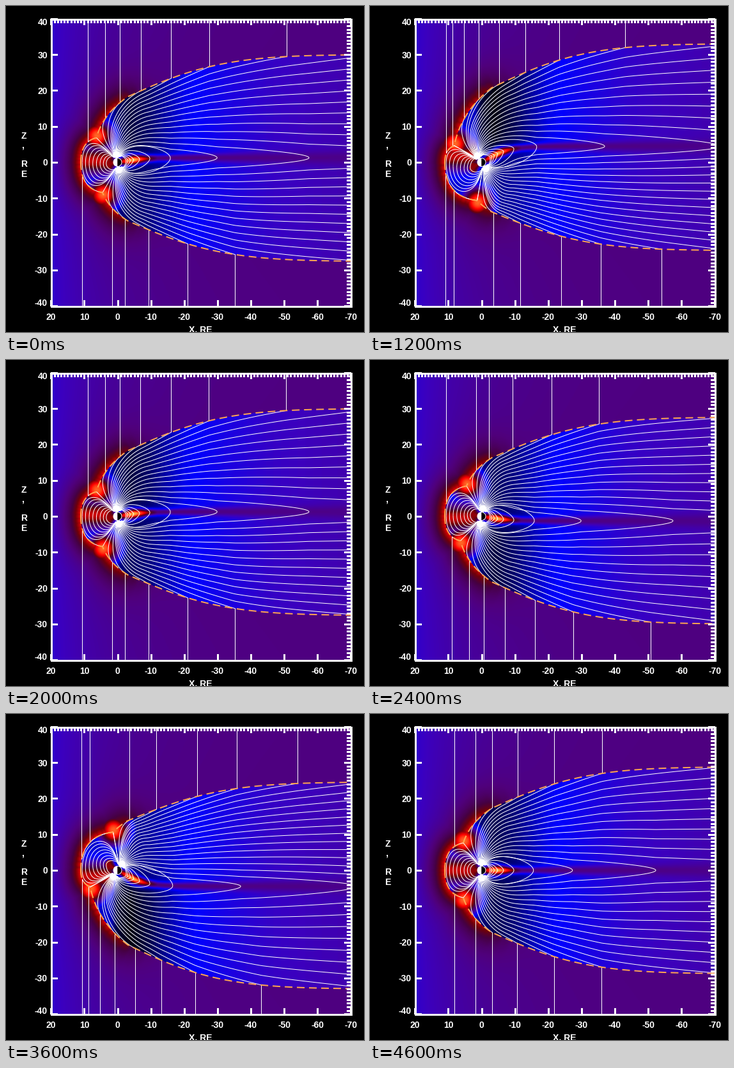
Write a matplotlib script that moves like this. It is 560 by 511 pixels and loops after 4800 ms.

```python
import numpy as np
import matplotlib.pyplot as plt
from matplotlib.animation import FuncAnimation
from matplotlib.collections import LineCollection
from matplotlib.colors import LinearSegmentedColormap
from matplotlib.patches import Circle, Rectangle, Wedge

W, H, DPI = 560, 511, 64
PT = 72 / DPI
FRAMES, INTERVAL = 24, 200
OX, OY = 174.5, 245          # Earth, in pixels
SX, SZ = 5.21, 5.63          # pixels per Earth radius
LEFT, RIGHT, TOP, BOTTOM = 70, 539, 20, 470
MAX_TILT = np.radians(35)

# Where each open line leaves the magnetopause, for a range of tilts.
TILTS = np.sin(np.radians([-75, -45, -15, 0, 15, 45, 75]))
EXITS = {
    -2: [118, 110, 110, 110, 110, 110, 110],
    -1: [131, 117, 110, 110, 110, 110, 110],
    0: [193, 149, 119, 110, 110, 110, 110],
    1: [235, 187, 166, 132, 128, 122, 119],
    2: [299, 226, 186, 165, 155, 134, 129],
    3: [361, 294, 223, 191, 178, 159, 147],
    4: [456, 366, 284, 231, 211, 184, 170],
    5: [560, 456, 358, 288, 258, 220, 202],
    6: [640, 560, 556, 363, 318, 265, 243],
    7: [720, 650, 640, 548, 439, 330, 296],
    8: [800, 740, 730, 640, 575, 548, 399],
    9: [880, 830, 820, 740, 680, 640, 570],
}
LAST_OPEN, FIRST_LOOP, LAST_LOOP = 18, 19, 25
DAY_LOOPS = [0.97, 0.88, 0.78, 0.68, 0.58, 0.48, 0.39, 0.31]

CMAP = LinearSegmentedColormap.from_list("heat", [
    (0, "#000000"), (0.25, "#0000ff"), (0.36, "#3c00be"), (0.46, "#50007d"),
    (0.55, "#460041"), (0.62, "#6e000a"), (0.75, "#ff0000"),
    (0.9, "#ff8c32"), (1, "#ffe650")])


def bezier(*pts, n=24):
    t = np.linspace(0, 1, n)[:, None]
    pts = [np.asarray(p, float) for p in pts]
    while len(pts) > 1:
        pts = [(1 - t) * a + t * b for a, b in zip(pts, pts[1:])]
    return pts[0]


def polar(angle, length):
    return length * np.array([np.cos(angle), np.sin(angle)])


def rotate(v, a):
    c, s = np.cos(a), np.sin(a)
    return np.array([v[0] * c - v[1] * s, v[0] * s + v[1] * c])


def sheet(x, s):
    """Height of the hinged current sheet above the axis."""
    return 8 * SZ * np.sin(MAX_TILT * s) * np.tanh((x - OX) / (8 * SX))


def cusp(s):
    return np.array([146 - 18.5 * s + 4 * s * s, 43 - 17.5 * s])


def boundary(s):
    """Magnetopause of one hemisphere, from the nose down the tail."""
    u = np.linspace(0, 380, 60)
    rise = 8 * SZ * np.sin(MAX_TILT * s) * (0.78 + 0.17 * np.tanh(u / 120))
    tail = np.c_[190 + u, 162 - 65 * np.exp(-u / 145 - u**2 / 45000) + rise]
    c, p = cusp(s), tail[0]
    nose = bezier((117, 0), (117, c[1] - 6), c)
    flank = bezier(c, (c[0] + 10, p[1] + 0.42 * (c[1] - p[1])), p)
    return np.vstack([nose, flank[1:], tail[1:]])


class Hemisphere:
    """Field lines of one half, with x to the tail and y away from the axis."""

    def __init__(self, s):
        self.s, self.psi = s, MAX_TILT * s
        self.edge = boundary(s)
        self.exits = {k: np.interp(s, TILTS, row) for k, row in EXITS.items()}
        a = abs(s)
        reach = [2.2, 2.6, 3.1, 3.8, 4.8, 6.6, 9.7,
                 15.6 + a, 27.3 + 10 * a, 52.3 + 20 * a, 110, 190]
        self.apex = OX + SX * np.array(reach)
        self.apex_id = np.arange(26, 14, -1)

    def rim(self, x):
        return np.interp(x, self.edge[:, 0], self.edge[:, 1])

    def foot(self, k):
        a = -self.psi + 0.5 * np.clip((k - 8) / 14, -1.2, 1.5)
        return np.array([OX + 9 * np.sin(a), 9 * np.cos(a)])

    def heading(self, k):
        """Launch angle, fanned from the cusp to the closed loops."""
        c = cusp(self.s)
        first = np.arctan2(c[1] - 10, c[0] - OX) - np.radians(10)
        return np.interp(k, [1, 19], [first, np.radians(54) + self.psi])

    def tail(self, k, x):
        inner = np.interp(x, self.apex, self.apex_id)
        outer = np.interp(x, list(self.exits.values()), list(self.exits))
        share = np.clip((inner - k) / (inner - outer), 0, 1)
        d, mid = 8, sheet(x, self.s)
        flux = share * (self.rim(x) - mid - d * np.log(2))
        return mid + d * np.arccosh(np.exp(flux / d))

    def rise(self, k, end, slope):
        """Curve from the polar cap to a point with the given slope."""
        p0, end = self.foot(k), np.array(end)
        length = np.hypot(*(end - p0))
        return bezier(p0, p0 + polar(self.heading(k), 0.4 * length),
                      end - polar(np.arctan(slope), 0.36 * length), end)

    def joint(self, k):
        return np.interp(k, [3, 17], [205, 237])

    def stretched(self, k, stop, closed=False):
        x0 = self.joint(k)
        t = np.linspace(0, 1, 90)
        x = x0 + (stop - x0) * (1 - (1 - t)**2 if closed else t)
        y = self.tail(k, x)
        slope = (self.tail(k, x0 + 4.0) - y[0]) / 4
        near = self.rise(k, (x0, y[0]), slope)
        return np.vstack([near[:-1], np.c_[x, y]])

    def open_line(self, k, x):
        c = cusp(self.s)
        x = np.floor(max(x, 117)) + 0.5
        if x > self.joint(k) + 15:
            line = self.stretched(k, x)
        elif x > c[0] + 4:
            slope = (self.rim(x) - self.rim(x - 8)) / 8
            line = self.rise(k, (x, self.rim(x)), min(slope, 2.5))
        else:
            back = np.linspace(c[0], x, 10)
            line = np.vstack([bezier(self.foot(k), c),
                              np.c_[back, self.rim(back)]])
        return np.vstack([line, (x, 230)])

    def night_loop(self, k):
        x = np.interp(-k, -self.apex_id, self.apex)
        p0, y, size = self.foot(k), sheet(x, self.s), x - OX
        lift = p0 + polar(self.heading(k), 0.42 * size)
        return bezier(p0, lift, (x, y + 0.17 * size), (x, y))

    def day_loop(self, f):
        c = cusp(self.s)
        y = -57 * f * np.tan(self.psi) * (1 - f)
        x = OX - 57 * f
        dip = rotate((-26, 43), self.psi)
        out = c + (-2 - OX, 6)
        lift = (OX, 0) + f * ((1 - f) * dip + f * out)
        top = y + f * ((1 - f) * 20 + f * (c[1] - 4))
        return bezier(self.foot(-3 - 3 * f), lift, (x, top), (x, y))

    def lines(self):
        out = [self.day_loop(f) for f in DAY_LOOPS]
        for k in range(-2, LAST_OPEN + 1):
            x = self.exits.get(k, 999)
            if x < 114:
                continue
            tip = self.apex[self.apex_id == k][0] if k > 14 else 999
            if x < RIGHT:
                out.append(self.open_line(k, x))
            else:
                out.append(self.stretched(k, min(tip, RIGHT), tip < RIGHT))
        out += [self.night_loop(k) for k in range(FIRST_LOOP, LAST_LOOP + 1)]
        return out


GX = np.arange(LEFT, RIGHT) + 0.5
GU = OY - (np.arange(TOP, BOTTOM) + 0.5)
X, U = np.meshgrid(GX, GU)
XR, ZR = (OX - X) / SX, U / SZ
NEAR = GX < 330


def sigmoid(v):
    return 1 / (1 + np.exp(-np.clip(v, -50, 50)))


def heat(s, north, south):
    """Scalar map behind the field lines."""
    inside = (X > 117) & (U < north.rim(GX)) & (U > -south.rim(GX))

    # magnetosheath with its halo around the nose
    rim = np.vstack([north.edge, south.edge * (1, -1)])
    rim = rim[rim[:, 0] < 330][::2]
    xn, un = X[:, NEAR], U[:, NEAR]
    dist = np.full(xn.shape, 1e9)
    for px, pu in rim:
        np.minimum(dist, (xn - px)**2 + (un - pu)**2, out=dist)
    outer = 0.455 - 0.12 * np.exp(-(X - LEFT) / (48 + 40 * np.abs(U) / 225))
    outer[:, NEAR] += (0.34 * np.exp(-np.sqrt(dist) / 19)
                       * sigmoid((192 - xn) / 16))

    # lobes
    mid = sheet(X, s)
    off = (U - mid) / SZ
    lobe = np.interp(-XR, [-2, 4, 10, 20, 30, 45, 70],
                     [0.14, 0.08, 0.12, 0.235, 0.285, 0.345, 0.385])
    lobe = lobe - 0.07 * s * np.tanh(off / 5) * np.exp(-(XR / 14)**2)

    # plasma sheet
    core = np.interp(-XR, [1, 3, 5, 7, 9, 12, 30, 70],
                     [0.66, 0.88, 0.95, 0.82, 0.66, 0.47, 0.45, 0.44])
    thick = np.interp(-XR, [0, 4, 9, 15, 70], [1, 1.5, 1, 0.9, 1.9])
    night = lobe + (core - lobe) * np.exp(-(off / thick)**2)

    # dayside
    day = 0.2 + 0.5 * np.exp(-((ZR - 1.8 * s) / 4)**2)
    ring = np.hypot(XR - 2.3, ZR + 2.3 * np.tan(MAX_TILT * s))
    day = np.where(ring < 1.4, 0.65, day)
    inner = night + (day - night) * sigmoid((XR - 1.2) * 2.5)

    v = np.where(inside, inner, outer)
    for sign in (1, -1):
        cx, cu = cusp(sign * s)
        d2 = (X - cx - 1)**2 + (U - sign * (cu + 3))**2
        v = np.maximum(v, 0.86 * np.exp(-d2 / 750))
    return np.clip(v, 0, 1)


fig = plt.figure(figsize=(W / DPI, H / DPI), dpi=DPI, facecolor="black")
ax = fig.add_axes([0, 0, 1, 1])
ax.axis("off")

image = ax.imshow(np.zeros_like(X), cmap=CMAP, vmin=0, vmax=1, aspect="auto",
                  extent=(LEFT, RIGHT, BOTTOM, TOP), interpolation="nearest")
ax.set_xlim(0, W)
ax.set_ylim(H, 0)
clip = Rectangle((LEFT, TOP), RIGHT - LEFT, BOTTOM - TOP,
                 transform=ax.transData)
field = LineCollection([], colors="white", linewidths=PT, zorder=3)
ax.add_collection(field, autolim=False)
field.set_clip_path(clip)
pause = []
for _ in range(2):
    line, = ax.plot([], [], color="#ffa550", lw=2 * PT, zorder=4,
                    dashes=(6, 3.5), dash_capstyle="butt")
    line.set_clip_path(clip)
    pause.append(line)

caps = [ax.add_patch(Circle((OX, OY), 5.5, color="white", lw=0, zorder=5))
        for _ in range(2)]
ax.add_patch(Wedge((OX, OY), 6.5, 90, 270, fc="white", lw=0, zorder=6))
ax.add_patch(Wedge((OX, OY), 6.5, -90, 90, fc="black", lw=0, zorder=6))
ax.add_patch(Circle((OX, OY), 6.5, fill=False, ec="white", lw=PT, zorder=7))


def ticks(xs, ys, dx, dy):
    segs = [[(x, y), (x + dx, y + dy)] for x, y in zip(xs, ys)]
    ax.add_collection(LineCollection(segs, colors="white", linewidths=3 * PT,
                                     antialiaseds=False, zorder=8),
                      autolim=False)


def label(x, y, text, ha="center"):
    ax.text(x, y, text, color="white", ha=ha, va="center_baseline",
            family="Liberation Sans", weight="bold", size=14 * PT, zorder=9)


ax.add_patch(Rectangle((LEFT + 0.5, TOP + 0.5), RIGHT - LEFT, BOTTOM - TOP,
                       fill=False, ec="white", lw=3 * PT, zorder=8,
                       antialiased=False))
major_x = OX - SX * np.arange(20, -71, -10)
major_y = OY - SZ * np.arange(40, -41, -10)
minor_x = OX - SX * np.arange(19, -70, -1)
minor_y = OY - SZ * np.arange(39, -40, -1)
ticks(major_x, [BOTTOM] * 10, 0, -9)
ticks(major_x, [TOP] * 10, 0, 9)
ticks([LEFT] * 9, major_y, 10, 0)
ticks([RIGHT] * 9, major_y, -10, 0)
ticks(minor_x, [TOP] * len(minor_x), 0, 6)
ticks([RIGHT] * len(minor_y), minor_y, -6, 0)

for value, x in zip(range(20, -71, -10), major_x):
    label(x, 487, str(value))
for value, y in zip(range(40, -41, -10), major_y):
    label(65, np.clip(y, 24, 464), str(value), "right")
label(304.5, 505.5, "X, RE")
for text, y in (("Z", 202), (",", 217), ("R", 247), ("E", 262)):
    label(28 if text != "," else 26, y, text)


def update(i):
    s = np.sin(2 * np.pi * (i + 1) / FRAMES)
    halves = Hemisphere(s), Hemisphere(-s)
    image.set_data(heat(s, *halves))
    segs = []
    for sign, half, line, cap in zip((1, -1), halves, pause, caps):
        flip, base = np.array([1, -sign]), np.array([0, OY])
        segs += [p * flip + base for p in half.lines()]
        line.set_data(*(half.edge * flip + base).T)
        a = half.psi
        cap.center = (OX - 12 * np.sin(a), OY - sign * 12 * np.cos(a))
    field.set_segments(segs)
    return [image, field, *pause, *caps]


anim = FuncAnimation(fig, update, frames=FRAMES, interval=INTERVAL,
                     repeat=True, repeat_delay=0, blit=False)
plt.show()
```
